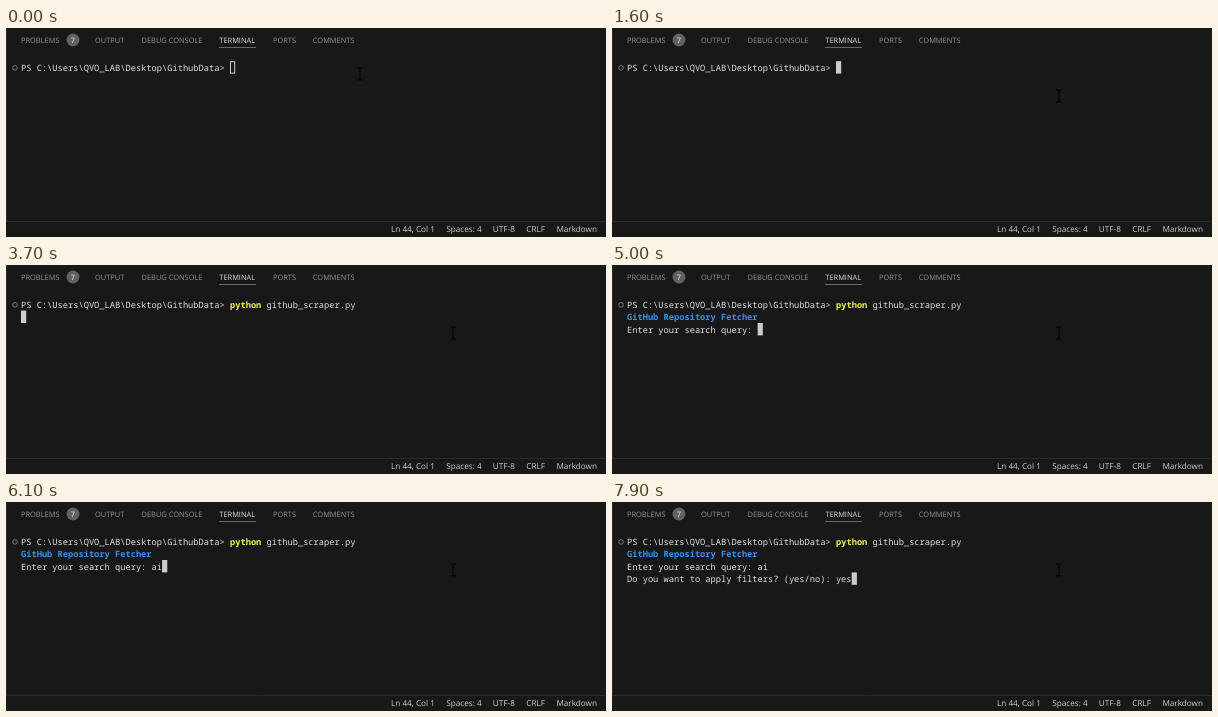
These frames come from a looping animation (600 by 209 pixels, 8 s). An HTML page:

```html
<!DOCTYPE html>
<html lang="en">
<head>
<meta charset="utf-8">
<title>Terminal session</title>
<style>
  html, body { margin: 0; width: 100%; height: 100%; overflow: hidden; background: #181818; }
  svg { display: block; width: 600px; height: 209px; }
  text { white-space: pre; text-rendering: geometricPrecision; }
  .ui { font-family: "Open Sans", "Noto Sans", sans-serif; }
  .tabs { font-size: 7.45px; fill: #949494; }
  .tabs .on { fill: #dedede; }
  .status { font-size: 8.2px; fill: #cccccc; }
  .term { font: 8.71px "Noto Sans Mono", "DejaVu Sans Mono", monospace; fill: #e0e0e0; }
  .cmd { fill: #f0f550; font-weight: 600; }
  .title { fill: #3b8eea; font-weight: 700; }
</style>
</head>
<body>
<svg viewBox="0 0 600 209">
  <rect width="600" height="209" fill="#181818"/>
  <path d="M0 193.5H600M.5 0V193" stroke="#2b2b2b" fill="none"/>

  <g class="ui tabs">
    <text x="15" y="15.2">PROBLEMS</text>
    <text x="89" y="15.2">OUTPUT</text>
    <text x="135.5" y="15.2">DEBUG CONSOLE</text>
    <text x="213.3" y="15.2" class="on">TERMINAL</text>
    <text x="267" y="15.2">PORTS</text>
    <text x="306.8" y="15.2">COMMENTS</text>
    <circle cx="67" cy="12" r="6.5" fill="#616161"/>
    <text x="67" y="14.7" text-anchor="middle" fill="#f8f8f8">7</text>
    <path d="M213 19.5H250" stroke="#7d7d7d" stroke-width=".8"/>
  </g>

  <g class="ui status">
    <text x="385" y="204.4">Ln 44, Col 1</text>
    <text x="440.3" y="204.4">Spaces: 4</text>
    <text x="486.8" y="204.4">UTF-8</text>
    <text x="520.3" y="204.4">CRLF</text>
    <text x="550.4" y="204.4">Markdown</text>
  </g>

  <circle cx="9" cy="39.9" r="2.3" fill="none" stroke="#868686" stroke-width=".9"/>
  <g class="term">
    <text x="15" y="43">PS C:\Users\QVO_LAB\Desktop\GithubData&gt; </text>
    <g id="command">
      <text x="224" y="43" class="cmd">python</text>
      <text x="260.6" y="43">github_scraper.py</text>
    </g>
    <text id="title" x="15" y="55.4" class="title">GitHub Repository Fetcher</text>
    <text id="query" x="15" y="67.8"></text>
    <text id="filter" x="15" y="80.2"></text>
  </g>
  <rect id="caret" width="5.2" height="12.4"/>
  <path id="mouse" d="M-3 -6H-1Q0 -6 0 -5Q0 -6 1 -6H3M0 -5V5M-3 6H-1Q0 6 0 5Q0 6 1 6H3" fill="none" stroke="#000"/>
</svg>
<script>
const LOOP = 8000, CHAR = 5.225, ROW = 12.4;
const QUERY = "Enter your search query: ";
const FILTER = "Do you want to apply filters? (yes/no): ";
const at = { focus: 1500, command: 3100, run: 3600, query: 5000, filter: 6500 };
const $ = id => document.getElementById(id);
const [command, title, query, filter, caret, mouse] =
  ["command", "title", "query", "filter", "caret", "mouse"].map($);

const show = (el, on) => el.setAttribute("visibility", on ? "visible" : "hidden");
const typed = (word, times, t) => word.slice(0, times.filter(k => t >= k).length);

// pointer stops: time, x, y
const stops = [[0, 354, 46], [100, 354, 46], [400, 385, 53], [1000, 385, 53], [1500, 447, 68], [LOOP, 447, 68]];

function pointer(t) {
  const i = stops.findIndex(s => s[0] > t);
  const [t0, x0, y0] = stops[i - 1], [t1, x1, y1] = stops[i];
  const p = (t - t0) / (t1 - t0), e = p * p * (3 - 2 * p);
  return [x0 + (x1 - x0) * e, y0 + (y1 - y0) * e];
}

function caretCell(t, queryText, filterText) {
  if (t >= at.filter) return [filterText.length, 3];
  if (t >= at.query) return [queryText.length, 2];
  if (t >= at.run) return [0, 1];
  return [t >= at.command ? 64 : 40, 0];
}

function draw(now) {
  const t = Math.floor((now % LOOP) / 100) * 100;
  const queryText = QUERY + typed("ai", [5600, 5800], t);
  const filterText = FILTER + typed("yes", [7400, 7500, 7700], t);
  show(command, t >= at.command);
  show(title, t >= at.query);
  query.textContent = t >= at.query ? queryText : "";
  filter.textContent = t >= at.filter ? filterText : "";

  const [col, row] = caretCell(t, queryText, filterText);
  const focused = t >= at.focus, inset = focused ? 0 : 0.5;
  caret.setAttribute("x", 15 + col * CHAR + inset);
  caret.setAttribute("y", 33.2 + row * ROW + inset);
  caret.setAttribute("width", 5.2 - 2 * inset);
  caret.setAttribute("height", ROW - 2 * inset);
  caret.setAttribute("fill", focused ? "#cccccc" : "none");
  caret.setAttribute("stroke", focused ? "none" : "#cccccc");

  mouse.setAttribute("transform", `translate(${pointer(t)})`);
  requestAnimationFrame(draw);
}
draw(0);
</script>
</body>
</html>
```
